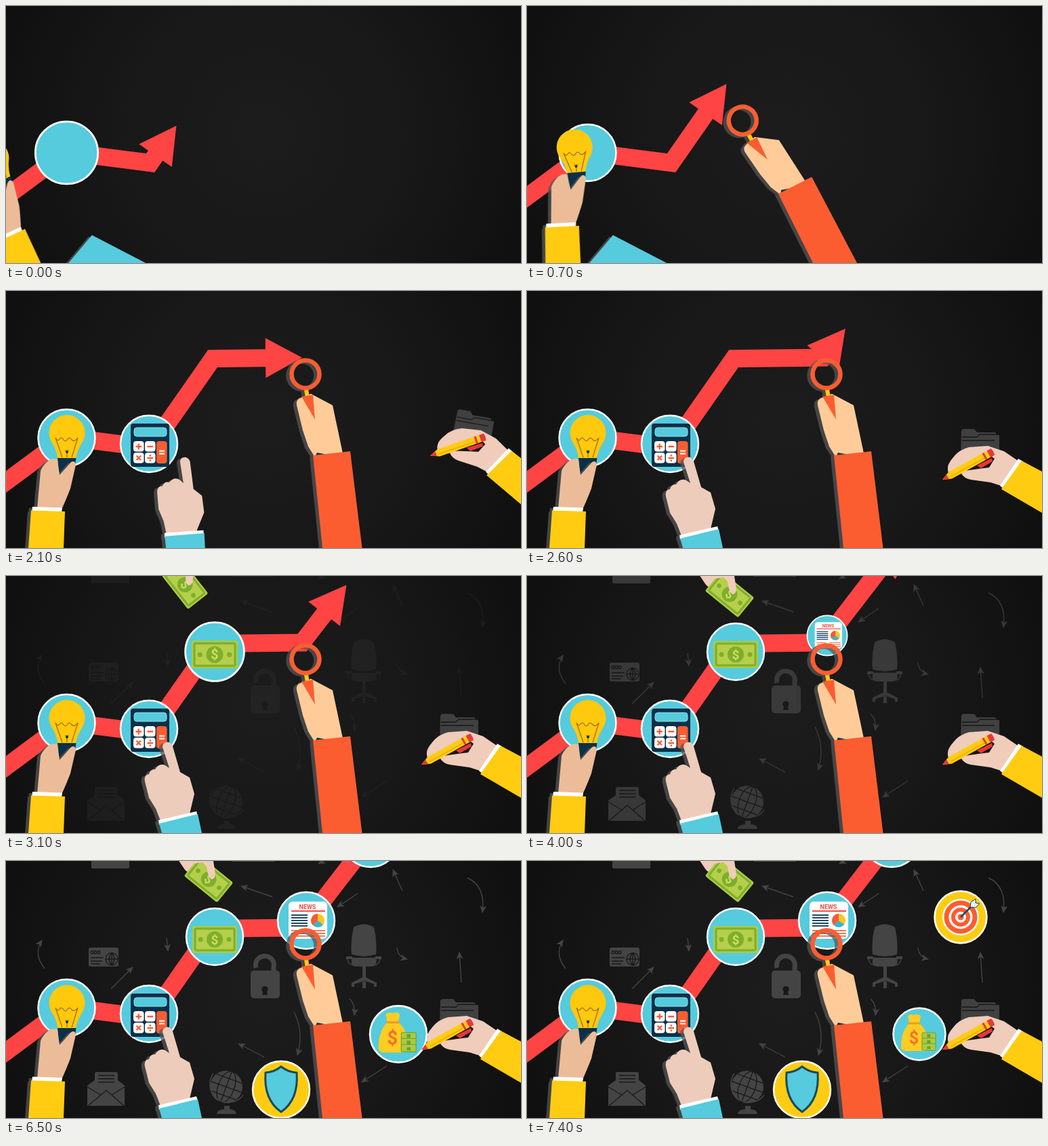
Recreate the animation shown at these times as an HTML page. Size 760 by 380 pixels, loop 7.5 s.

```html
<!DOCTYPE html>
<html lang="en">
<head>
<meta charset="utf-8">
<title>Business growth</title>
<style>
html, body { margin: 0; width: 100%; height: 100%; overflow: hidden; background: #111; }
svg { display: block; width: 760px; height: 380px; }
text { font: bold 9px Roboto, Arial, sans-serif; text-anchor: middle; }
.disc { fill: #55cbdd; stroke: #fff; stroke-width: 2.5; }
.gold { fill: #ffcc11; }
.shadow { filter: drop-shadow(-5px 2px 0 rgba(85, 85, 85, .75)); }
.line { fill: none; stroke: #444; stroke-width: 1.4; }
.cut { fill: none; stroke: #191919; stroke-width: 1.3; }
</style>
</head>
<body>
<svg viewBox="0 0 760 380">
<defs>
  <radialGradient id="bg" gradientUnits="userSpaceOnUse" cx="380" cy="190" r="430">
    <stop offset="0" stop-color="#1c1c1c"/><stop offset=".5" stop-color="#181818"/><stop offset="1" stop-color="#0f0f0f"/>
  </radialGradient>
  <marker id="tip" markerUnits="userSpaceOnUse" markerWidth="12" markerHeight="10" refX="10" refY="5" orient="auto">
    <path d="M0 0L11 5L0 10L3 5Z" fill="#444"/>
  </marker>
  <g id="bill">
    <rect x="-33" y="-20" width="66" height="40" rx="3" fill="#a9cb45"/>
    <rect x="-29" y="-16" width="58" height="32" rx="2" fill="#b5cf4b" stroke="#7fae2c" stroke-width="3"/>
    <circle r="12" fill="#7fae2c"/>
    <circle cx="-21" r="3.5" fill="#7fae2c"/><circle cx="21" r="3.5" fill="#7fae2c"/>
    <text y="6.500" fill="#c8de62" style="font-size:19px">$</text>
  </g>
</defs>

<rect width="760" height="380" fill="url(#bg)"/>

<g id="icons" fill="#444">
  <path d="M126 0H182V9Q182 11 180 11H128Q126 11 126 9ZM334 0H397V1H334Z"/>
  <!-- card -->
  <rect x="122" y="128" width="44" height="28" rx="3"/>
  <g class="cut">
    <circle cx="156" cy="145" r="9"/><path d="M147 145H165M156 136V154M156 136Q148 145 156 154Q164 145 156 136"/>
    <path d="M125 143H144M125 148H142M125 152H139"/>
    <circle cx="127" cy="135" r="2"/><circle cx="132" cy="135" r="2"/><circle cx="137" cy="135" r="2"/>
  </g>
  <!-- lock -->
  <rect x="361" y="162" width="43" height="41" rx="5"/>
  <path d="M369 158A13.5 13.5 0 1 1 395 157V163" fill="none" stroke="#444" stroke-width="7"/>
  <path d="M382 185a4.500 4.500 0 0 1 3 8l1 5h-8l1-5a4.500 4.500 0 0 1 3-8Z" fill="#181818"/>
  <!-- chair -->
  <path d="M513 98Q528 89 543 98Q548 118 546 138Q528 144 510 138Q508 118 513 98ZM511 143H546Q549 155 540 156H516Q507 155 511 143ZM502 141H511V145H502ZM545 141H554V145H545ZM526 156H531V172L547 180V186H543V182L529 177L514 182V186H510V180L526 172Z"/>
  <path class="line" d="M504 144Q505 154 514 154M552 144Q551 154 543 154" stroke-width="3"/>
  <rect x="526" y="178" width="5" height="10"/>
  <!-- letter -->
  <path d="M120 332L131 324V314Q131 312 133 312H162Q165 312 165 315V324L175 332V362H120Z"/>
  <path class="cut" d="M136 317H160M136 322H160M136 327H160M120 334L140 346L148 339L156 346L175 334M140 346L121 362M156 346L174 362"/>
  <!-- globe -->
  <path d="M322 362H330V367Q340 368 340 374H311Q311 368 322 367Z"/>
  <circle cx="325" cy="334" r="24"/>
  <g class="cut" transform="rotate(20 325 334)">
    <path d="M301 334H349M325 310V358M305 321H345M305 347H345"/>
    <ellipse cx="325" cy="334" rx="12" ry="24"/>
  </g>
  <path class="line" d="M306 314A27 27 0 1 0 350 346" stroke-width="2"/>
  <g id="arrows" class="line"></g>
</g>

<path id="trend" d="M-20 297L89 216L213 232L305 100L437 98.500L538 -33L640 -80L1000 -246" fill="none" stroke="#ff4444" stroke-width="26" stroke-miterlimit="8"/>
<path id="head" d="M0 0L-54 -29.500V29.500Z" fill="#ff4444"/>

<g data-pop="-350" data-at="89.500 217"><circle class="disc" r="42"/></g>

<g data-pop="1150" data-at="211 226">
  <circle class="disc" r="42"/>
  <rect x="-27" y="-30" width="57" height="64" rx="4" fill="#0c3047"/>
  <rect x="-22" y="-24" width="48" height="13" rx="4" fill="#55cbdd" stroke="#8fe0ec" stroke-width="1"/>
  <g fill="#fff">
    <rect x="-23" y="-4" width="15.500" height="15.500" rx="4"/><rect x="-6" y="-4" width="15.500" height="15.500" rx="4"/>
    <rect x="-23" y="13" width="15.500" height="15.500" rx="4"/><rect x="-6" y="13" width="15.500" height="15.500" rx="4"/>
  </g>
  <rect x="11" y="-4" width="15.500" height="33" rx="4" fill="#fb5d31"/>
  <path d="M-19.500 4H-11M-15.300 -.3V8.300M-2.500 4H6M-18.500 17.500L-12 24M-12 17.500L-18.500 24M-2.500 21H6M1.800 16V18.500M1.800 23.500V26" stroke="#fb5d31" stroke-width="2.300"/>
  <path d="M15 10.500H23M15 14.500H23" stroke="#fff" stroke-width="2"/>
</g>

<g data-pop="2600" data-at="308 112"><circle class="disc" r="42"/><use href="#bill" y="4"/></g>

<g data-pop="3880" data-at="443 88">
  <circle class="disc" r="42"/>
  <rect x="-26" y="-28" width="57" height="55" rx="6" fill="#fff"/>
  <text x="2" y="-17.500" fill="#f04e45">NEWS</text>
  <path d="M-22 -14H28" stroke="#f04e45" stroke-width="2"/>
  <path d="M-22 -8H2M-22 -4H2M-22 0H2M-22 4H2M-22 8H2" stroke="#1b4a66" stroke-width="2"/>
  <circle cx="17" r="10" fill="#ffc61a"/>
  <path d="M17 0V-10A10 10 0 0 0 10 7Z" fill="#f25a3c"/><path d="M17 0L10 7A10 10 0 0 0 25 6Z" fill="#37b6cf"/>
  <path d="M-22 15H-3M5 15H28M-22 19H-3M5 19H28M-22 23H28" stroke="#f47a5c" stroke-width="2"/>
</g>

<g data-pop="4500" data-at="538 -33"><circle class="disc" r="42"/></g>

<g data-pop="5700" data-at="406 338">
  <circle class="disc gold" r="42"/>
  <path d="M0 -34Q10 -26 23 -25Q26 15 0 33Q-26 15 -23 -25Q-10 -26 0 -34Z" fill="#55cbdd" stroke="#174a63" stroke-width="3"/>
</g>

<g data-pop="6100" data-at="579 256">
  <circle class="disc" r="38.500"/>
  <path d="M-17 -27Q-12 -31 -8 -28Q-4 -31 2 -27L0 -16Q14 -4 14 18Q14 25 6 25H-20Q-27 25 -27 18Q-27 -4 -15 -16Z" fill="#ffcc22"/>
  <path d="M-16 -16H1" stroke="#f29a1f" stroke-width="3"/>
  <text x="-8" y="14" fill="#f0742b" style="font-size:25px">$</text>
  <g fill="#a9cb45" stroke="#6e9f2d">
    <rect x="4" y="-2" width="20" height="9" rx="1"/><rect x="4" y="6" width="20" height="9" rx="1"/><rect x="4" y="14" width="20" height="10" rx="1"/>
  </g>
  <path d="M14 0V22" stroke="#6e9f2d" stroke-width="5" stroke-dasharray="5 4"/>
</g>

<g data-pop="6500" data-at="640 83">
  <circle class="disc gold" r="38.500"/>
  <circle r="27" fill="#fff"/><circle r="21" fill="#fff" stroke="#fb5d31" stroke-width="7"/>
  <circle r="11" fill="#fff" stroke="#fb5d31" stroke-width="6"/><circle r="4.500" fill="#fb5d31"/>
  <path d="M0 0L21 -21" stroke="#174a63" stroke-width="2.500"/>
  <path d="M14 -15L15 -22L22 -27L22 -21L28 -20L22 -14Z" fill="#e6f3f5" stroke="#174a63"/>
</g>

<g id="bulb">
  <path d="M76 247Q75 235 67 223A26.500 26.500 0 1 1 113 223Q105 235 103 247Z" fill="#ffc90e"/>
  <path d="M83 246L73 217Q76 223 79 219Q82 215 85 220Q88 224 91 219Q94 215 97 220Q101 224 106 217L97 246M90 237V246M87 236H93" fill="none" stroke="#a2660c" stroke-width="1.200"/>
  <circle cx="90" cy="238" r="2" fill="#0c3047"/>
  <path d="M76 247H103.500L101 263L94 272H78Z" fill="#0c3047"/>
  <g class="shadow">
    <path d="M46 322L51 266Q53 260 60 253Q69 246 76 249L79 272L96 253Q102 250 103 257L95 292Q88 310 82 323Z" fill="#ecbc98"/>
    <path d="M39 319L83 320.500L82 328H38Z" fill="#fff"/>
    <path d="M37 324.500L87 326L85 380L78 540H18L33 380Z" fill="#ffcc11"/>
  </g>
</g>

<g class="shadow"><g id="finger">
  <path d="M231 253Q231 246 238 245.500Q244 246 246 252L257 290L271 298L278 322L270 356L228 362L221 344L211 328L205 304Q203 294 211 293Q213 285 220 286Q226 276 235 280L241 284Z" fill="#eeccbb"/>
  <path d="M225 361L281 348L283 355L226 368Z" fill="#fff"/>
  <path d="M226 366L283 352L289 380L328 560H270L230 380Z" fill="#55cbdd"/>
</g></g>

<g id="pencil">
  <path d="M641 208Q641 204 645 204H660L664 209H689Q693 209 693 213H697V244H640Z" fill="#404040"/>
  <path class="cut" d="M642 216H664L668 212H696M642 221H690" stroke="#222"/>
  <path d="M621 261Q621 255 629 246Q637 235 652 231L680 229L704 237L726 252L703 289L684 283L655 279Q645 277 641 270L627 274Q620 270 621 261Z" fill="#f0ccbb"/>
  <path d="M645 266L655 253Q665 245 682 242L690 248L682 261L666 263Z" fill="#161616"/>
  <path d="M664 258L686 247L687 252L670 262Z" fill="#e8373b"/>
  <g transform="translate(613 279) rotate(-29)">
    <path d="M0 0L13 -5.500H85V5.500H13Z" fill="#ffcc11"/>
    <path d="M0 0L9 -4V4ZM70 -5.500H73V5.500H70ZM78 -5.500H85Q87 0 85 5.500H78Z" fill="#e8373b"/>
    <path d="M13 2H70" stroke="#f2a51a" stroke-width="1.500"/>
  </g>
  <path d="M725 248L732 252L704 293L698 288Z" fill="#fff"/>
  <path d="M730 251L760 267L940 360L900 420L760 328L700 293Z" fill="#ffcc11"/>
</g>

<g id="cash">
  <path d="M250 -8L262 10Q268 20 275 15L292 -2L330 -120H250Z" fill="#f0ccbb"/>
  <use href="#bill" transform="translate(299 27) rotate(39) scale(.95)"/>
  <path d="M270 -12H308L306 0L309 20Q308 28 302 26Q298 24 296 8L290 2L276 4Z" fill="#f0ccbb"/>
  <path d="M270 -10H310L400 -240H300Z" fill="#f0ccbb"/>
</g>

<g class="shadow"><g id="lens">
  <path d="M429 169Q427 161 435 158L450 152L482 169L497 240L456 246L446 230L438 206Z" fill="#ffcc99"/>
  <path d="M440 146L446 145L448 158H442Z" fill="#ffc90e"/>
  <path d="M436 156L453 153.500L456 190Z" fill="#fb5d31"/>
  <circle cx="442" cy="123" r="20.500" fill="none" stroke="#fb5d31" stroke-width="6.500"/>
  <path d="M459 239L480 243L456 245Z" fill="#0c3047"/>
  <path d="M453 243L508 237L525.500 380L546 560H490L467 380Z" fill="#fb5d31"/>
</g></g>
</svg>

<script>
const LOOP = 7500, STEP = 100;
const el = id => document.getElementById(id);
const progress = (t, start, dur) => Math.min(1, Math.max(0, (t - start) / dur));

el("arrows").innerHTML = [
  "M155 189L187 157", "M393 53L347 37", "M519 48L489 68", "M585 44L571 13", "M672 180L669 135",
  "M381 290L343 270", "M562 303L525 327", "M482 -8L461 4", "M237 114L239 133",
  "M57 159Q40 138 53 117", "M681 25Q708 37 703 76", "M425 223Q440 253 430 287",
  "M577 128Q578 142 592 145", "M507 204Q516 212 514 228"
].map(d => `<path d="${d}" marker-end="url(#tip)"/>`).join("");

// Each hand swings about its pivot: x, y, angle, start, duration, sideways slide
const swings = [
  ["bulb", 70, 430, -27, 0, 1200, -10],
  ["lens", 507, 485, -90, 250, 865, 0],
  ["finger", 250, 416, 130, 1300, 1086, 0],
  ["pencil", 821, 335, 70, 1300, 1290, 0],
  ["cash", 344, -133, 60, 2600, 935, 0]
];
const pops = [...document.querySelectorAll("[data-pop]")];
const trend = el("trend");

function popScale(u) {
  const v = u - 1;
  return u ? 1 + 2.7 * v ** 3 + 1.7 * v ** 2 : 0;
}

function drawTrend(t) {
  const len = 328 + 0.1075 * t;
  const tip = trend.getPointAtLength(len), base = trend.getPointAtLength(len - 54);
  const angle = Math.atan2(tip.y - base.y, tip.x - base.x) * 180 / Math.PI;
  trend.setAttribute("stroke-dasharray", `${len - 46} 3000`);
  el("head").setAttribute("transform", `translate(${tip.x} ${tip.y}) rotate(${angle})`);
}

function draw(now) {
  const t = Math.floor(now % LOOP / STEP) * STEP;
  drawTrend(t);
  el("icons").setAttribute("opacity", progress(t, 2800, 1600));
  for (const [id, x, y, angle, start, dur, slide] of swings) {
    const left = (1 - progress(t, start, dur)) ** 2;
    el(id).setAttribute("transform", `translate(${slide * left} 0) rotate(${angle * left} ${x} ${y})`);
  }
  for (const g of pops) {
    const s = popScale(progress(t, +g.dataset.pop, 600));
    g.setAttribute("transform", `translate(${g.dataset.at}) scale(${s})`);
  }
}

const begin = performance.now();
(function frame() {
  draw(performance.now() - begin);
  requestAnimationFrame(frame);
})();
</script>
</body>
</html>
```
